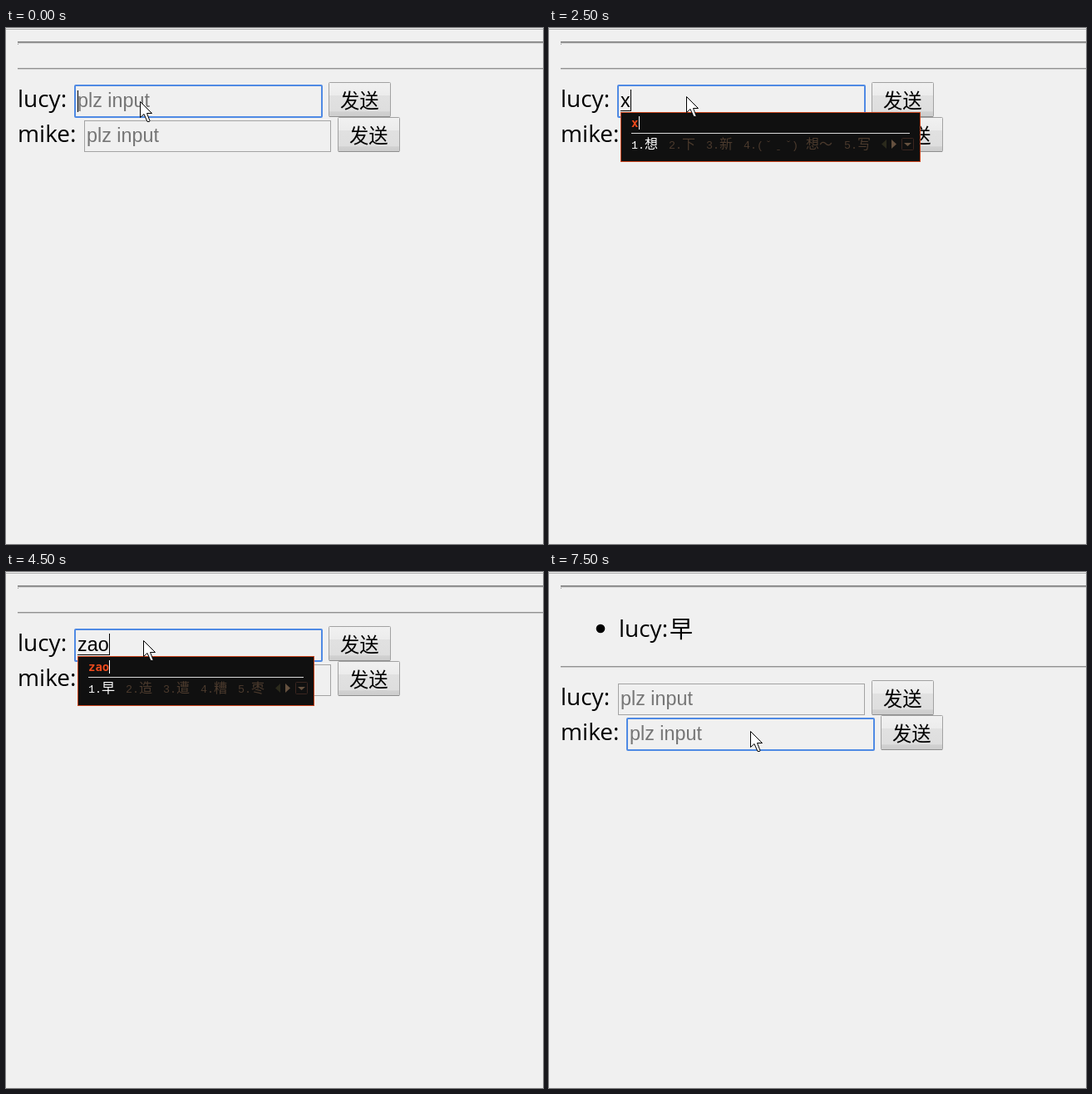
An HTML page for the animation above (8 s loop, 646 by 620 pixels).

```html
<!DOCTYPE html>
<html lang="zh">
<head>
<meta charset="utf-8">
<title>Chat form</title>
<style>
  html, body { margin: 0; width: 646px; height: 620px; overflow: hidden; background: #f0f0f0; }
  svg { display: block; }
  .label { font: 28px "Open Sans", "Noto Sans", sans-serif; }
  .item { font: 28px "Noto Sans CJK SC", "Noto Sans CJK", sans-serif; }
  .field { font: 23.33px "Liberation Sans", Arial, sans-serif; }
  .cjk { font: 23.33px "Noto Sans CJK SC", "Noto Sans CJK", sans-serif; }
  .num { font: 13.33px "Liberation Mono", monospace; }
  .cand { font: 300 16px "Noto Sans CJK SC", "Noto Sans CJK", sans-serif; }
  .typed { font: bold 14px "DejaVu Sans Mono", monospace; }
</style>
</head>
<body>
<svg id="stage" width="646" height="620" viewBox="0 0 646 620">
  <defs>
    <linearGradient id="face" x1="0" y1="0" x2="0" y2="1">
      <stop offset="0" stop-color="#f1f1f1"/>
      <stop offset=".37" stop-color="#ececec"/>
      <stop offset=".38" stop-color="#e1e1e1"/>
      <stop offset=".84" stop-color="#dedede"/>
      <stop offset=".86" stop-color="#d0d0d0"/>
      <stop offset="1" stop-color="#cdcdcd"/>
    </linearGradient>
    <linearGradient id="hover" x1="0" y1="0" x2="0" y2="1">
      <stop offset="0" stop-color="#f6f6f6"/>
      <stop offset=".37" stop-color="#f1f1f1"/>
      <stop offset=".38" stop-color="#e8e8e8"/>
      <stop offset=".84" stop-color="#e4e4e4"/>
      <stop offset="1" stop-color="#d6d6d6"/>
    </linearGradient>
  </defs>
  <g id="scene"></g>
</svg>
<script>
const STEP = 500;
const LOOP = 8000;
const scene = document.getElementById('scene');

const listX = { words: ['想', '下', '新', '(ˇˍˇ) 想～', '写'], key: 'x' };
const listZ = { words: ['在', '中', '做', '再', '这'], key: 'z' };
const listZao = { words: ['早', '造', '遭', '糟', '枣'], key: 'zao' };

// Each step holds until the next one; values carry over.
const steps = [
  { at: 0, mouse: [161, 88], focus: 'lucy', caret: 86 },
  { at: 500, mouse: [165, 82], caret: 0 },
  { at: 1000, caret: 86 },
  { at: 1500, caret: 0 },
  { at: 2000, caret: 86 },
  { at: 2500, text: 'x', ime: listX, caret: 98 },
  { at: 3000, caret: 0 },
  { at: 3500, text: '', ime: null, caret: 86 },
  { at: 4000, text: 'z', ime: listZ, caret: 98 },
  { at: 4500, text: 'zao', ime: listZao, caret: 124 },
  { at: 5000, text: '早', ime: null, caret: 109 },
  { at: 5500, mouse: [427, 85], hover: true, caret: 0 },
  { at: 6000, mouse: [292, 156], hover: false, text: '', focus: '', sent: true },
  { at: 6500, mouse: [242, 191] },
  { at: 7000, focus: 'mike', caret: 97 },
  { at: 7500, caret: 0 }
];

const rect = (x, y, w, h, fill, more = '') =>
  `<rect x="${x}" y="${y}" width="${w}" height="${h}" fill="${fill}" ${more}/>`;
const text = (x, y, str, cls, fill = '#000') =>
  `<text x="${x}" y="${y}" class="${cls}" fill="${fill}">${str}</text>`;

function field(x, y, focused) {
  return focused
    ? rect(x, y, 297, 38, '#f0f0f0', 'rx="1" stroke="#4f8ae4" stroke-width="2"')
    : rect(x + .5, y + .5, 296, 37, '#f0f0f0', 'stroke="#a3a3a3"');
}

function button(x, y, hover) {
  return rect(x + .5, y + .5, 74, 41, `url(#${hover ? 'hover' : 'face'})`, 'rx="1" stroke="#a2a2a2"')
    + rect(x + 1, y + 41, 73, 1, '#8e8e8e')
    + text(x + 14, y + 31, '发送', 'cjk');
}

function row(name, x, y, s) {
  const focused = s.focus === name;
  const value = name === 'lucy' ? s.text : '';
  const base = y + 30;
  let out = text(14, base, name + ':', 'label') + field(x, y + 4, focused);
  if (!value) out += text(x + 3, base, 'plz input', 'field', '#757575');
  else if (value === '早') out += text(x + 3, base + 2, value, 'cjk');
  else {
    out += text(x + 3, base, value, 'field');
    out += rect(x + 3, base + 4, value.length > 1 ? 38 : 12, 1, '#000');
  }
  if (focused && s.caret) out += rect(s.caret, y + (value ? 9 : 10), 1, 26, '#000');
  return out + button(x + 305, y, s.hover && name === 'lucy');
}

function candidate(x, i, word) {
  const color = i ? '#4b3a2d' : '#fff';
  let out = text(x, 145, i + 1 + '.', 'num', color);
  if (word.length === 1) return [out + text(x + 16, 145, word, 'cand', color), x + 32];
  out += text('250 260 272 284 292', 145, word.slice(0, 5), 'num', color);
  out += text('309 325', 145, word.slice(-2), 'cand', color);
  return [out, x + 108];
}

function popup({ words, key }) {
  let x = 99, list = '';
  words.forEach((word, i) => {
    const [part, end] = candidate(x, i, word);
    list += part;
    x = end + 13;
  });
  const right = x + 47;
  return rect(86.5, 101.5, right - 87, 59, '#101010', 'stroke="#c8431c"')
    + text(99, 119, key, 'typed', '#f04a1c')
    + rect(100 + 8 * key.length, 106, 1, 16, '#fff')
    + rect(99, 126, right - 112, 1, '#d8d8d8')
    + list
    + `<path d="M${x + 6} 134v11l-6-5.5z" fill="#2b2a1c"/>`
    + `<path d="M${x + 12} 134v11l6-5.5z" fill="#65513f"/>`
    + rect(x + 24.5, 132.5, 14, 14, 'none', 'rx="1" stroke="#3a2620"')
    + `<path d="M${x + 27} 138h9l-4.500 4z" fill="#65513f"/>`;
}

const pointer = ([x, y]) =>
  `<path transform="translate(${x} ${y})" d="M.5 .5V19.500L5 15.500L9 24.500H11.500L12 23.500L8.500 14.500H14.500Z" fill="#fff" stroke="#000"/>`;

function draw(s) {
  const shift = s.sent ? 65 : 0;
  let out = rect(0, 1, 646, 1, '#b0b0b0')
    + rect(14, 16, 632, 2, '#8f8f8f') + rect(14, 18, 1, 2, '#9a9a9a')
    + rect(14, 18, 632, 1, '#d8d8d8')
    + rect(14, 48 + shift, 632, 1, '#929292') + rect(14, 49 + shift, 632, 1, '#c8c8c8');
  if (s.sent) {
    out += '<circle cx="62" cy="68" r="5.300"/>'
      + text(84, 78, 'lucy:', 'label') + text(145, 79, '早', 'item');
  }
  out += row('lucy', 83, 65 + shift, s) + row('mike', 94, 107 + shift, s);
  if (s.ime) out += popup(s.ime);
  scene.innerHTML = out + pointer(s.mouse);
}

let state = { text: '', ime: null, hover: false, sent: false };
const states = steps.map(step => (state = { ...state, ...step }));

const start = performance.now();
let shown = -1;
function tick() {
  const time = (performance.now() - start) % LOOP;
  const now = Math.floor(time / STEP);
  if (now !== shown) draw(states[shown = now]);
  requestAnimationFrame(tick);
}
tick();
</script>
</body>
</html>
```
